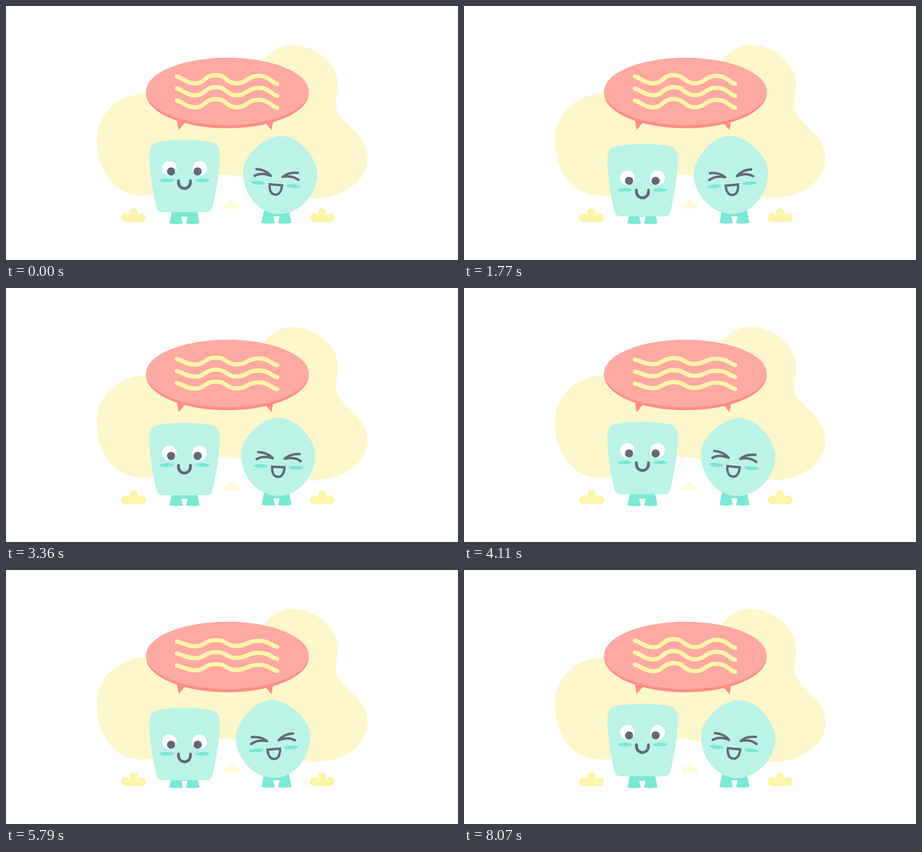
An HTML page with a canvas that plays this animation: 960x540 px, repeating every 8100 ms.

```html
<!DOCTYPE html>
<html lang="en">
<head>
<meta charset="utf-8">
<title>Two friends chatting</title>
<style>
  html, body { margin: 0; width: 100%; height: 100%; overflow: hidden; background: #fff; }
  canvas { display: block; }
</style>
</head>
<body>
<canvas id="stage" width="960" height="540"></canvas>
<script>
const ctx = document.getElementById('stage').getContext('2d');
const LOOP = 8100, STEP = 30, TAU = Math.PI * 2;

const color = {
  blob: '#fdf7cb', bush: '#fdf5a8', paleBush: '#fefbdb',
  bubble: '#ffa9a3', bubbleEdge: '#ff8e87',
  body: '#bbf3e7', leg: '#7be8d4', ink: '#636878'
};

const blob = new Path2D(`M606 82 C655 84 706 120 705 168 C705 185 700 195 701 212
  C702 250 768 268 768 324 C768 372 715 409 655 408 C600 408 530 359 460 359
  C395 359 360 403 290 403 C230 403 193 350 193 285 C193 230 235 190 297 185
  C420 178 500 165 545 117 C565 96 583 82 606 82Z`);
// Centred on x = 0, standing on y = 0.
const bush = new Path2D(`M-17.2 0 a9.2 9.2 0 0 1 0 -18.4 c6 0 10 3 12.5 7.5
  c-1 -4 -4 -5 -4 -9.5 a8.7 8.7 0 0 1 17.4 0 c0 4.5 -3 5.5 -4 9.5
  c2.5 -4.5 6.5 -7.5 12.5 -7.5 a9.2 9.2 0 0 1 0 18.4Z`);
const legs = new Path2D(`M-25 -35 L-32 -1.5 Q-18 1.5 -3.3 -1 L-6.8 -15.5 H6.8
  L3.3 -1 Q18 1.5 32 -1.5 L25 -35Z`);
const squareBody = new Path2D(`M304.5 318 C304.5 300 310 291.5 324 289 Q379 279.5 434 289
  C448 291.5 454 300 454 318 C454 350 447 390 439.5 424 C437 434 434 438.5 426 438.5
  H332 C324 438.5 321 434 318.5 424 C311 390 304.5 350 304.5 318Z`);
const smile = new Path2D('M366.3 371.5 V375 A12.7 13 0 0 0 391.7 375 V371.5');
// The round friend is drawn around the point where it stands.
const roundBody = new Path2D(`M0 -166 C38 -166 79 -120 79 -87 C79 -45 45 0 0 0
  C-45 0 -79 -45 -79 -87 C-79 -120 -38 -166 0 -166Z`);
const squint = new Path2D('M46 -91 Q25 -92 12.5 -79.5 Q34 -86 48.5 -75');
const laugh = new Path2D('M-13.2 -61.5 H13.2 C13.2 -48 8 -40.5 0 -40.5 C-8 -40.5 -13.2 -48 -13.2 -61.5Z');
const tails = new Path2D('M363 242 L366.5 264 L381 247Z M567.5 244 L564 264 L551 249Z');

const mix = (a, b, k) => a + (b - a) * k;

function fill(path, style) {
  ctx.fillStyle = style;
  ctx.fill(path);
}

function stroke(path, style, width, cap, join) {
  ctx.strokeStyle = style;
  ctx.lineWidth = width;
  ctx.lineCap = cap;
  ctx.lineJoin = join;
  ctx.stroke(path);
}

function oval(x, y, rx, ry, style) {
  ctx.fillStyle = style;
  ctx.beginPath();
  ctx.ellipse(x, y, rx, ry, 0, 0, TAU);
  ctx.fill();
}

function at(x, y, draw) {
  ctx.save();
  ctx.translate(x, y);
  draw();
  ctx.restore();
}

function drawBush(x, y, size, style) {
  at(x, y, () => {
    ctx.scale(size, size);
    fill(bush, style);
  });
}

function drawBubble(flat) {
  fill(tails, color.bubbleEdge);
  oval(470.2, 185, 173, 75, color.bubbleEdge);
  oval(470.2, 181.6, 173, 71.6, color.bubble);
  const start = mix(150, 152.2, flat), dip1 = mix(164.5, 162, flat);
  const top1 = mix(146.8, 149, flat), dip2 = mix(164.3, 161.2, flat);
  const top2 = mix(148.6, 150.5, flat), end = mix(165.5, 163.5, flat);
  const wave = new Path2D(`M363 ${start} C374 ${start + 2} 384 ${dip1} 402 ${dip1}
    C422 ${dip1} 422 ${top1} 446 ${top1} C468 ${top1} 468 ${dip2} 490 ${dip2}
    C512 ${dip2} 512 ${top2} 537 ${top2} C558 ${top2} 565 ${end - 2} 576 ${end}`);
  for (let i = 0; i < 3; i++) {
    at(0, i * 25.5, () => stroke(wave, color.bush, 9, 'round', 'round'));
  }
}

function drawSquare(sink) {
  at(379, 463.5, () => fill(legs, color.leg));
  at(0, 9 * sink, () => fill(squareBody, color.body));
  at(0, 20.8 * sink, () => {
    for (const side of [-1, 1]) {
      oval(379 + side * 32, 345.3, 15.6, 15.6, '#fff');
      oval(378.8 + side * 28.2, 351.6, 8.7, 8.7, color.ink);
      oval(379.2 + side * 37.7, 371, 15, 3.8, color.leg);
    }
    stroke(smile, color.ink, 6, 'round', 'round');
  });
}

function drawRound(tilt, slide) {
  at(574.5, 462.5, () => fill(legs, color.leg));
  at(574.5, 442, () => {
    ctx.rotate(tilt);
    fill(roundBody, color.body);
    ctx.translate(slide, 0);
    for (const side of [-1, 1]) {
      oval(side * 37.5, -62, 15, 3.9, color.leg);
      ctx.save();
      ctx.scale(side, 1);
      stroke(squint, color.ink, 5, 'butt', 'round');
      ctx.restore();
    }
    stroke(laugh, color.ink, 5, 'butt', 'miter');
  });
}

function draw(t) {
  const sway = TAU * t / (LOOP / 2);
  const lean = (1 - Math.cos(sway)) / 2;
  const flat = (1 - Math.cos(TAU * t / (LOOP / 9))) / 2;
  const tilt = (5.4 - 11 * lean) * Math.PI / 180;
  const slide = -2.2 - 8.1 * Math.cos(sway - 0.925);

  ctx.fillStyle = '#fff';
  ctx.fillRect(0, 0, 960, 540);
  fill(blob, color.blob);
  drawBush(271, 459.2, 1, color.bush);
  drawBush(671.5, 459.2, 1, color.bush);
  drawBush(479, 431.3, 0.68, color.paleBush);
  drawBubble(flat);
  drawSquare(lean);
  drawRound(tilt, slide);
}

function tick(now) {
  draw(Math.floor((now % LOOP) / STEP) * STEP);
  requestAnimationFrame(tick);
}
draw(0);
requestAnimationFrame(tick);
</script>
</body>
</html>
```
